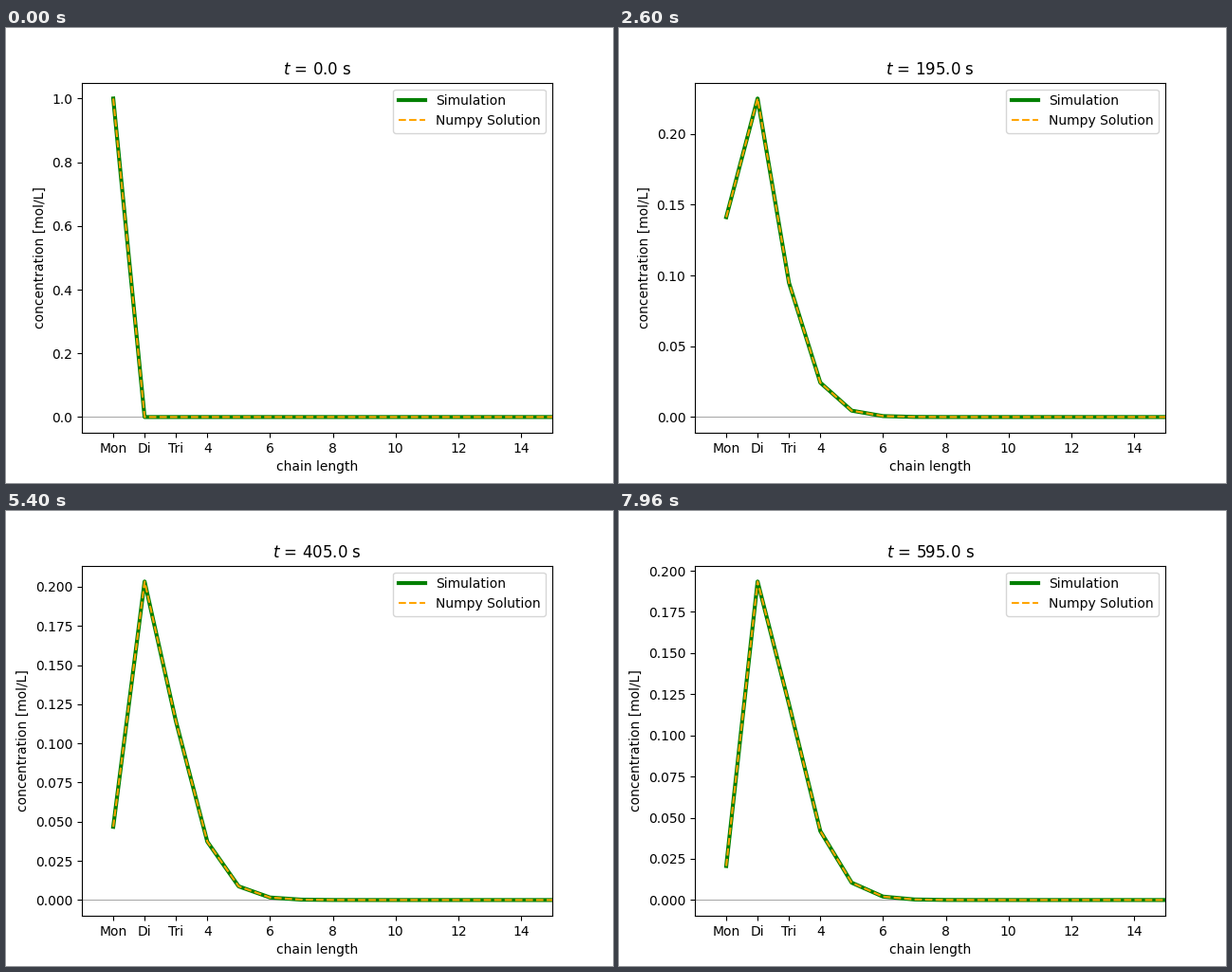
Write a matplotlib script that moves like this. It is 640 by 480 pixels and loops after 8000 ms.

```python
import numpy as np
import matplotlib.pyplot as plt
from math import factorial
from matplotlib.animation import FuncAnimation

FRAMES = 240
LOOP_MS = 8000
DT = 2.5      # simulated seconds per frame
K = 0.01      # rate constant, L/(mol s)

# Step growth by monomer addition: with dtau = K*M*dt the chain
# concentrations are closed-form, and K*t = integral of exp(s)/(1-s).
chain = np.arange(1, 21)
fact = np.array([float(factorial(n)) for n in range(21)])
s = np.linspace(0, 0.97, 20001)
f = np.exp(s) / (1 - s)
kt = np.concatenate(([0], np.cumsum((f[1:] + f[:-1]) / 2 * np.diff(s))))


def concentrations(t):
    tau = np.interp(K * t, kt, s)
    terms = tau ** np.arange(21) / fact
    return (terms[:-1] - terms[1:]) * np.exp(-tau)


fig, ax = plt.subplots(figsize=(6.4, 4.8), dpi=100)
ax.axhline(0, color="gray", lw=0.5)
sim, = ax.plot([], [], color="green", lw=3, label="Simulation")
ref, = ax.plot([], [], "--", color="orange", lw=1.5, label="Numpy Solution")
ax.set_xlim(0, 15)
ax.set_xticks([1, 2, 3, 4, 6, 8, 10, 12, 14],
              ["Mon", "Di", "Tri", "4", "6", "8", "10", "12", "14"])
ax.set_xlabel("chain length")
ax.set_ylabel("concentration [mol/L]")
ax.legend(loc="upper right")
title = ax.set_title("")


def update(i):
    t = i * DT
    c = concentrations(t)
    sim.set_data(chain, c)
    ref.set_data(chain, c)
    top = c.max()
    ax.set_ylim(-0.05 * top, 1.05 * top)
    title.set_text(f"$t$ = {t:.1f} s")
    return sim, ref, title


anim = FuncAnimation(fig, update, frames=FRAMES, interval=LOOP_MS / FRAMES,
                     repeat=True, repeat_delay=0, blit=False)
plt.show()
```
